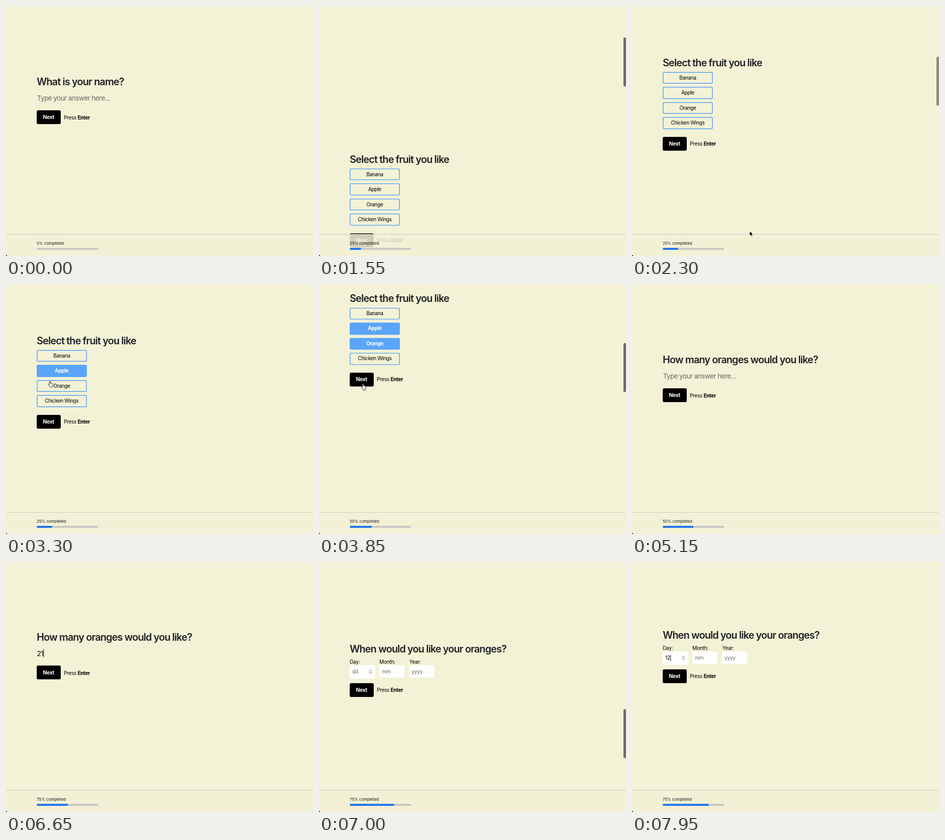
Write an HTML page that moves like this. It is 600 by 489 pixels and loops after 8 s.

```html
<!DOCTYPE html>
<html lang="en">
<head>
<meta charset="utf-8">
<title>Fruit form</title>
<style>
html, body { margin: 0; width: 100%; height: 100%; overflow: hidden; background: #f3f2d6; }
#stage {
  position: relative; width: 600px; height: 489px; overflow: hidden; background: #f3f2d6; color: #000;
  font: 10px/20px Inter, "Liberation Sans", sans-serif; font-optical-sizing: none; letter-spacing: -.038em;
}
#stage * { box-sizing: border-box; }
#page, .slide, .t, .next, .opt, .box, #foot, #track, #bar, #thumb, #cursor, #cursor svg, .caret { position: absolute; }
#page { inset: 0; animation: scroll 8s ease-in-out infinite; }
.slide { left: 0; width: 600px; height: 489px; }

/* one text line, vertically centred on its top value */
.t { left: 60px; height: 20px; margin-top: -10px; white-space: nowrap; }
.title { font-size: 19.5px; font-weight: 600; letter-spacing: -.044em; color: #1e2124; }
.field { font-size: 13.4px; letter-spacing: -.045em; left: 60.5px; top: 179.5px; }
.hint { color: #6b6b63; }
.press { left: 113px; }
b { font-weight: 700; }
.next {
  left: 60px; width: 46.5px; height: 27px; border-radius: 3px; background: #000; color: #fff;
  font-weight: 700; font-size: 10.2px; line-height: 27px; text-align: center;
}
.opt {
  left: 60px; width: 98px; height: 23.5px; border-radius: 3px;
  box-shadow: inset 0 0 0 1.5px #5ba4f3; line-height: 23.5px; text-align: center;
}
.on { position: absolute; inset: 0; border-radius: 3px; background: #5aa5f8; color: #fff; font-weight: 700; }
.box { top: 175px; width: 49px; height: 24px; border-radius: 2px; background: #fff; }
.box.focus { top: 174.5px; width: 49.5px; height: 26px; }
.caret { left: 60px; top: 171px; width: 1px; height: 16px; background: #222; }
.typed::after {
  content: ""; display: inline-block; width: 1px; height: 1.2em; margin-left: .5px;
  vertical-align: -.24em; background: #222;
}

#foot { left: 0; top: 446px; width: 600px; height: 43px; background: rgba(243, 242, 214, .86); border-top: 1px solid #c6c5c6; }
#foot .t { top: 17.8px; font-size: 7.7px; letter-spacing: 0; color: #15171a; }
#track { left: 60px; top: 25.5px; width: 120px; height: 4.5px; border-radius: 2.25px; background: #c9c7c5; overflow: hidden; }
#bar { left: 0; top: 0; height: 5px; background: #2176ee; animation: bar 8s ease infinite; }
#thumb {
  left: 595px; top: 2px; width: 5px; height: 96px; border-radius: 2.5px; background: #706f62;
  animation: thumb 8s ease-in-out infinite, thumbFade 8s linear infinite;
}
#corner { position: absolute; left: 0; bottom: 0; width: 3px; height: 3px; background: radial-gradient(circle at 100% 0, transparent 2.4px, #000 3px); }
#cursor { left: 0; top: 0; animation: move 8s ease-in-out infinite, shown 8s step-end infinite; }
#cursor svg { left: -4px; top: -1px; overflow: visible; }

.s { animation: 8s step-end infinite; }
@keyframes scroll {
  0%, 16.27% { transform: translateY(0) }
  21.77%, 46.57% { transform: translateY(-489px) }
  52.07%, 82.92% { transform: translateY(-978px) }
  88.42%, 100% { transform: translateY(-1467px) }
}
@keyframes thumb {
  0%, 16.27% { transform: translateY(0) }
  21.77%, 46.57% { transform: translateY(97px) }
  52.07%, 82.92% { transform: translateY(194px) }
  88.42%, 100% { transform: translateY(291px) }
}
@keyframes thumbFade {
  0%, 16.4% { opacity: 0 } 17%, 28% { opacity: 1 } 31.2%, 46.9% { opacity: 0 }
  47.5%, 58.1% { opacity: 1 } 61.2%, 83.2% { opacity: 0 } 83.7%, 94.7% { opacity: 1 } 97.8%, 100% { opacity: 0 }
}
@keyframes bar {
  0%, 16.125% { width: 0 } 23.625%, 46.2% { width: 30px }
  53.7%, 82.81% { width: 60px } 90.31%, 100% { width: 90px }
}
@keyframes move {
  0%, 28.75% { transform: translate(230px, 440px) }
  36%, 39% { transform: translate(86px, 166px) }
  42.2%, 58.1% { transform: translate(86px, 196px) }
  62%, 100% { transform: translate(-14px, 120px) }
}
@keyframes shown { 0% { opacity: 0 } 28.75% { opacity: 1 } 62%, 100% { opacity: 0 } }
@keyframes hand { 0% { opacity: 0 } 33.6% { opacity: 1 } 49%, 100% { opacity: 0 } }
@keyframes arrow { 0% { opacity: 1 } 33.6% { opacity: 0 } 49%, 100% { opacity: 1 } }
@keyframes p0 { 0% { opacity: 1 } 16.125%, 100% { opacity: 0 } }
@keyframes p25 { 0% { opacity: 0 } 16.125% { opacity: 1 } 46.2%, 100% { opacity: 0 } }
@keyframes p50 { 0% { opacity: 0 } 46.2% { opacity: 1 } 82.81%, 100% { opacity: 0 } }
@keyframes p75 { 0% { opacity: 0 } 82.81%, 100% { opacity: 1 } }
@keyframes name0 { 0% { opacity: 1 } 3.75%, 100% { opacity: 0 } }
@keyframes name1 { 0% { opacity: 0 } 3.75% { opacity: 1 } 11.25%, 100% { opacity: 0 } }
@keyframes name2 { 0% { opacity: 0 } 11.25% { opacity: 1 } 12.5%, 100% { opacity: 0 } }
@keyframes name3 { 0% { opacity: 0 } 12.5%, 100% { opacity: 1 } }
@keyframes nameCaret { 0% { opacity: 0 } 1.25% { opacity: 1 } 3.75%, 100% { opacity: 0 } }
@keyframes apple { 0% { opacity: 0 } 37.5%, 100% { opacity: 1 } }
@keyframes orange { 0% { opacity: 0 } 42.75%, 100% { opacity: 1 } }
@keyframes count0 { 0% { opacity: 1 } 71.25%, 100% { opacity: 0 } }
@keyframes count1 { 0% { opacity: 0 } 71.25% { opacity: 1 } 74.375%, 100% { opacity: 0 } }
@keyframes count2 { 0% { opacity: 0 } 74.375%, 100% { opacity: 1 } }
@keyframes countCaret { 0% { opacity: 0 } 57.5% { opacity: 1 } 63.75% { opacity: 0 } 70% { opacity: 1 } 71.25%, 100% { opacity: 0 } }
@keyframes day0 { 0% { opacity: 1 } 94.375%, 100% { opacity: 0 } }
@keyframes day1 { 0% { opacity: 0 } 94.375% { opacity: 1 } 96.875%, 100% { opacity: 0 } }
@keyframes day2 { 0% { opacity: 0 } 96.875%, 100% { opacity: 1 } }
</style>
</head>
<body>
<div id="stage">
  <div id="page">
    <section class="slide" style="top:0">
      <div class="t title" style="top:148px">What is your name?</div>
      <div class="t field hint s" style="animation-name:name0">Type your answer here...</div>
      <i class="caret s" style="animation-name:nameCaret"></i>
      <div class="t field typed s" style="animation-name:name1">L</div>
      <div class="t field typed s" style="animation-name:name2">Le</div>
      <div class="t field typed s" style="animation-name:name3">Lem</div>
      <div class="next" style="top:204px">Next</div>
      <div class="t press" style="top:217.5px">Press <b>Enter</b></div>
    </section>

    <section class="slide" style="top:489px">
      <div class="t title" style="top:111.3px">Select the fruit you like</div>
      <div class="opt" style="top:128.5px">Banana</div>
      <div class="opt" style="top:158px">Apple<div class="on s" style="animation-name:apple">Apple</div></div>
      <div class="opt" style="top:187.5px">Orange<div class="on s" style="animation-name:orange">Orange</div></div>
      <div class="opt" style="top:217px">Chicken Wings</div>
      <div class="next" style="top:255.5px">Next</div>
      <div class="t press" style="top:269px">Press <b>Enter</b></div>
    </section>

    <section class="slide" style="top:978px">
      <div class="t title" style="top:148px">How many oranges would you like?</div>
      <div class="t field hint s" style="animation-name:count0">Type your answer here...</div>
      <i class="caret s" style="animation-name:countCaret"></i>
      <div class="t field typed s" style="animation-name:count1">2</div>
      <div class="t field typed s" style="animation-name:count2">21</div>
      <div class="next" style="top:204px">Next</div>
      <div class="t press" style="top:217.5px">Press <b>Enter</b></div>
    </section>

    <section class="slide" style="top:1467px">
      <div class="t title" style="top:142.7px">When would you like your oranges?</div>
      <div class="t" style="top:167.5px">Day:</div>
      <div class="t" style="top:167.5px;left:118px">Month:</div>
      <div class="t" style="top:167.5px;left:176.5px">Year:</div>
      <div class="box focus" style="left:60px"></div>
      <div class="box" style="left:118px"></div>
      <div class="box" style="left:176px"></div>
      <div class="t hint s" style="top:187.3px;left:65px;animation-name:day0">dd</div>
      <div class="t typed s" style="top:187.3px;left:65px;animation-name:day1">1</div>
      <div class="t typed s" style="top:187.3px;left:65px;animation-name:day2">12</div>
      <div class="t hint" style="top:187.3px;left:123px">mm</div>
      <div class="t hint" style="top:187.3px;left:181px">yyyy</div>
      <svg width="7" height="11" style="position:absolute;left:96.5px;top:182px">
        <rect x=".75" y=".75" width="5.5" height="9.5" rx="2.7" fill="#fff" stroke="#c4c4c4" stroke-width=".7"/>
        <path d="M2.2 4.3 3.5 2.7 4.8 4.3M2.2 6.7 3.5 8.3 4.8 6.7" fill="none" stroke="#444" stroke-width=".9"/>
      </svg>
      <div class="next" style="top:209.5px">Next</div>
      <div class="t press" style="top:223px">Press <b>Enter</b></div>
    </section>
  </div>

  <div id="foot">
    <div class="t s" style="animation-name:p0">0% completed</div>
    <div class="t s" style="animation-name:p25">25% completed</div>
    <div class="t s" style="animation-name:p50">50% completed</div>
    <div class="t s" style="animation-name:p75">75% completed</div>
    <div id="track"><div id="bar"></div></div>
  </div>
  <div id="thumb"></div>
  <div id="corner"></div>

  <div id="cursor">
    <svg class="s" style="animation-name:arrow" width="10" height="14">
      <path d="M4 1V11L6.3 8.9 7.8 12.3 9.4 11.6 7.9 8.3H11Z" fill="#000" stroke="#fff" stroke-width=".8"/>
    </svg>
    <svg class="s" style="animation-name:hand" width="10" height="13">
      <path d="M3 7V1.7Q3-.2 4.1.6 4.6 1 4.7 1.8L5 4.3Q6-.0 6.5 4.5 7.8 3.8 8 5 9.5 4.5 9.6 6.2V8.5Q9.5 10 8.6 11V12.4H4.2V11.3Q2.8 9.8 2 8.3L.8 6.5Q.6 5.3 1.8 5.8Z"
        fill="#fff" stroke="#222" stroke-width=".9" stroke-linejoin="round"/>
      <path d="M5.1 8V10M6.6 8V10M8 8V10" stroke="#555" stroke-width=".5"/>
    </svg>
  </div>
</div>
</body>
</html>
```
